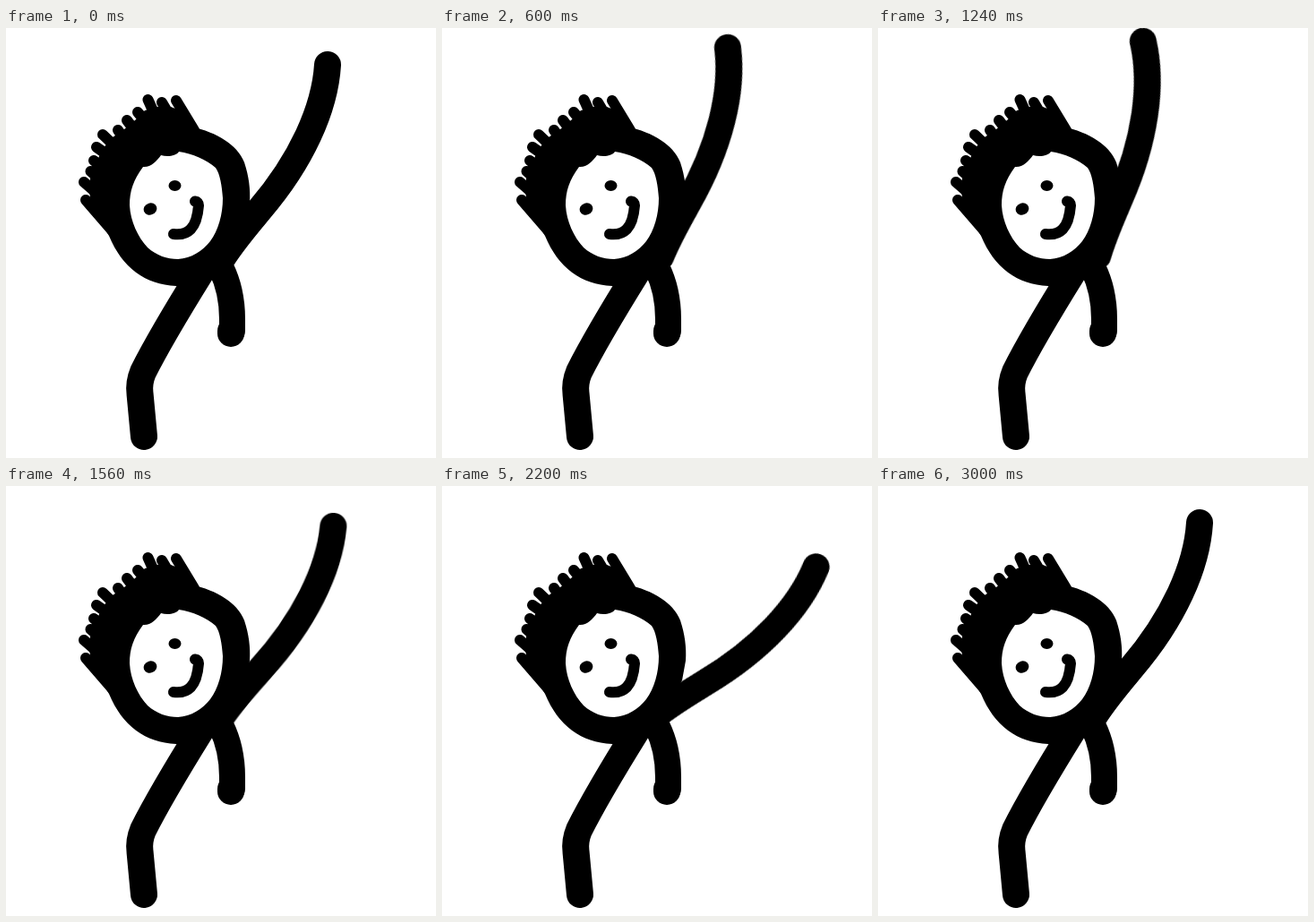
An HTML page for the animation above (3120 ms loop, 480 by 480 pixels).

```html
<!DOCTYPE html>
<html lang="en">
<head>
<meta charset="utf-8">
<title>Waving figure</title>
<style>
  html, body { margin: 0; width: 100%; height: 100%; overflow: hidden; background: #fff; }
  svg { display: block; width: 100%; height: 100%; }
  .line { fill: none; stroke: #000; stroke-width: 30; stroke-linecap: round; stroke-linejoin: round; }
  .thin { stroke-width: 12; }
  .arm {
    transform-origin: 238px 244px;
    animation: wave 3120ms ease-in-out infinite;
  }
  @keyframes wave {
    0%, 3.85% { transform: rotate(0deg); }
    33.33% { transform: rotate(-20deg); }
    65.06% { transform: rotate(20deg); }
    95.03%, 100% { transform: rotate(0deg); }
  }
</style>
</head>
<body>
<svg viewBox="0 0 480 480">
  <!-- legs -->
  <path class="line" d="M154 456 L149.5 408 Q148 396 153 384 C170 350 190 317 218 272"/>
  <path class="line" style="stroke-width: 29px" d="M240 268 C248 284 252.5 302 252.5 325 V338"/>
  <path class="line" d="M251 338 V341"/>

  <path class="line arm" d="M359 41 C356 90 330 148 283 203 C268 221 255 236 242 256"/>

  <!-- head and hair -->
  <path d="M207 110 C236 117 258 130 266 150 C271 165 273 180 272 195 L268 217 L252 245 L228 272
           C217 284 203 289 190 288 C155 286 130 268 115 232 L96 200 L93 183 L94 168 L99 156 L104 143
           L111 131 L119 122 L132 113 L144 103 L155 92 L168 88 L184 88 L194 92 Z"/>
  <path class="line thin" d="M89 192 L121 229 M87 172 L110 192 M94.5 160 L115 178 M98 148 L120 165
           M101 133 L125 150 M108 119 L130 140 M125 114 L140 135 M135 103 L152 125 M147 94 L165 115
           M158.5 80 L172 110 M174 83 L190 110 M190 81 L210 114"/>

  <!-- face -->
  <path fill="#fff" d="M153 155 C142 170 138 182 138 198 C139 216 147 233 158 245 C168 254 180 258 192 258
           C207 257 219 249 228 238 C237 226 242 208 242 190 C241 176 239 163 234 156
           C224 147 208 140 193 138 C190 143 180 144 173 142 C168 149 161 156 153 155 Z"/>
  <ellipse cx="161" cy="202" rx="7.5" ry="6.5" transform="rotate(-20 161 202)"/>
  <ellipse cx="188.5" cy="176" rx="7" ry="6"/>
  <path class="line thin" d="M187 230 C203 232 213 224 215 198 Q215 194 211 193.5"/>
</svg>
</body>
</html>
```
